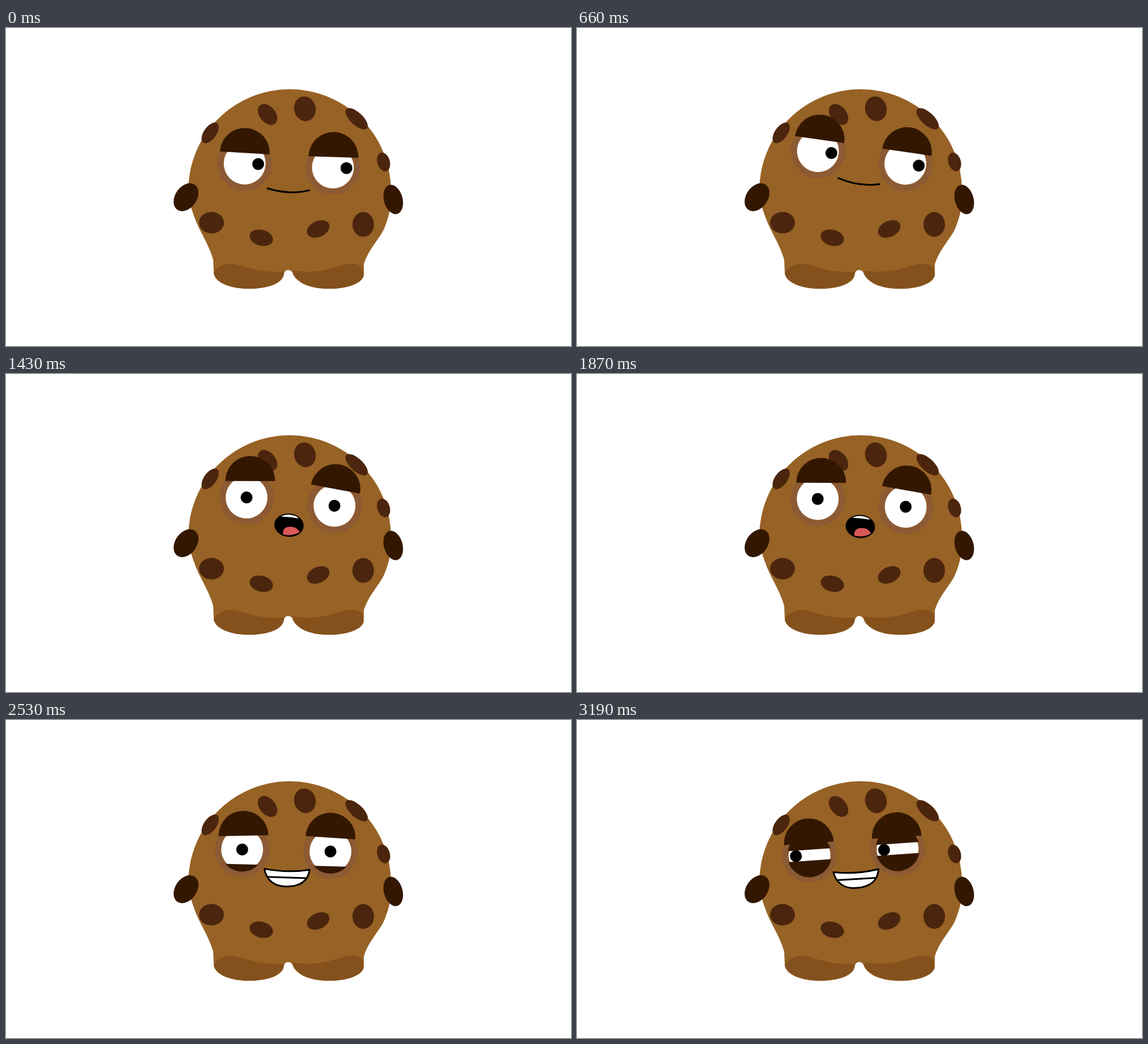
Animation of 998 by 561 pixels, one loop 3.36 s. Source, as an HTML page with a canvas:

```html
<!DOCTYPE html>
<html lang="en">
<head>
<meta charset="utf-8">
<title>Cookie</title>
<style>
html, body { margin: 0; width: 100%; height: 100%; overflow: hidden; background: #fff; }
canvas { display: block; }
</style>
</head>
<body>
<canvas id="stage" width="998" height="561"></canvas>
<script>
const ctx = document.getElementById('stage').getContext('2d');
const STEP = 110, LOOP = 3360, LAST = 29;
const DARK = '#331700', CHIP = '#4b250d', BODY = '#976225', FOOT = '#84511c', RING = '#8c5a33';
const CX = 501, CY = 287;
const EYE_GAP = 78, EYE_R = 37, LID_R = 39, LOOK = 24;

// Head poses; the whole face hangs on these.
const poses = [
  { at: 0, x: 499.5, y: 242.5, tilt: 2.6, lift: 18.5 },
  { at: 6, x: 502.8, y: 228.3, tilt: 8.2, lift: 20.5 },
  { at: 10, x: 502.3, y: 223.5, tilt: 5.6, lift: 30 },
  { at: 21, x: 503.3, y: 229.5, tilt: 4.8, lift: 28.2 },
  { at: 25, x: 487, y: 231, tilt: -2.2, lift: 20.6 },
  { at: 29, x: 488.5, y: 233, tilt: -4, lift: 20.8 }
];

const body = new Path2D(`M322 287 A179 179 0 0 1 680 287 C682 310 677 333 667 356
  C660 371 640 391 632 417 L632 437 C628 452 600 460 570 460 C540 460 517 452 507 435
  C506 425 492 424 491 434 C489 451 462 460 430 460 C398 460 370 450 367 433
  L366 409 C358 380 340 356 333 334 C326 315 322 302 322 287 Z`);
const leftFoot = new Path2D(`M367 433 C371 422 386 416 397 416 C420 417 440 433 490 430
  C494 448 462 460 430 460 C398 460 370 450 367 433 Z`);
const rightFoot = new Path2D(`M508 428 C568 436 583 416 612 416 C623 416 629 420 631 428
  L631 437 C628 452 600 460 570 460 C535 460 505 445 508 428 Z`);
const smile = new Path2D('M-38 0 Q2 11 38 0');
const teeth = new Path2D('M-15 -14 C-8 -20 10 -20 16 -13.5 Q0 -15 -15 -14 Z');
const tongue = new Path2D('M-9 17 C-11 9 -7 3 3 2.5 C12 2 16 5 20 10.5 Q6 20 -9 17 Z');
const grin = new Path2D('M-40 -15 Q0 -8 40 -15 C37 9 18 15.5 -2 15.5 C-22 15.5 -36 5 -40 -15 Z');
const biteLine = new Path2D('M-34 -0.7 L34 0');

const rad = deg => deg * Math.PI / 180;
const mix = (a, b, k) => a + (b - a) * k;
const ramp = (n, from, to) => Math.min(1, Math.max(0, (n - from) / (to - from)));

function poseAt(n) {
  const i = Math.max(1, poses.findIndex(p => p.at >= n));
  const a = poses[i - 1], b = poses[i], k = ramp(n, a.at, b.at);
  const pose = {};
  for (const key in a) pose[key] = mix(a[key], b[key], k);
  return pose;
}

// Half height of the eye opening: a squint at 10, a full blink at 25.
function lidAt(n) {
  const squint = 9.5 + 12 * Math.abs(n - 10);
  const blink = n < 25 ? 13 * (25 - n) : 2.4 * (n - 25);
  return Math.min(squint, blink);
}

const gazeAt = n => LOOK * (1 - ramp(n, 10, 12) - ramp(n, 23, 26));

function place(x, y, tilt, draw) {
  ctx.save();
  ctx.translate(x, y);
  ctx.rotate(rad(tilt));
  draw();
  ctx.restore();
}

function oval(x, y, rx, ry, color, tilt = 0) {
  ctx.beginPath();
  ctx.ellipse(x, y, rx, ry, rad(tilt), 0, 7);
  ctx.fillStyle = color;
  ctx.fill();
}

function arc(r, from, to) {
  ctx.beginPath();
  ctx.arc(0, 0, r, from, to);
  ctx.fillStyle = DARK;
  ctx.fill();
}

function fill(path, color) {
  ctx.fillStyle = color;
  ctx.fill(path);
}

function drawChips() {
  for (const [angle, size] of [[-144, 21], [-47, 25], [-17, 17]]) {
    const x = CX + 173.5 * Math.cos(rad(angle)), y = CY + 173.5 * Math.sin(rad(angle));
    oval(x, y, size, 11, CHIP, angle + 90);
  }
  const slim = [[462, 152.5, 50], [451, 370, 15], [551.5, 354.5, -25]];
  const plump = [[528, 142.5, 75], [363, 343.5, 0], [631, 346.5, 90]];
  for (const [x, y, tilt] of slim) oval(x, y, 21, 14, CHIP, tilt);
  for (const [x, y, tilt] of plump) oval(x, y, 22, 19, CHIP, tilt);
}

function drawBody() {
  ctx.fillStyle = '#fff';
  ctx.fillRect(0, 0, 998, 561);
  fill(body, BODY);
  fill(leftFoot, FOOT);
  fill(rightFoot, FOOT);
  drawChips();
  oval(318, 298.5, 27, 19, DARK, -55);
  oval(684, 302.5, 26.5, 16.5, DARK, 75);
}

function drawEye(gaze, lid) {
  oval(0, 0, 48, 48, RING);
  oval(0, 0, EYE_R, EYE_R, '#fff');
  oval(gaze, 0, 10.5, 10.5, '#000');
  if (lid >= EYE_R) return;
  const a = Math.asin(lid / LID_R);
  arc(LID_R, a, Math.PI - a);
  arc(LID_R, Math.PI + a, -a);
  if (lid < 2) {
    ctx.beginPath();
    ctx.moveTo(-38, 0);
    ctx.lineTo(38, 0);
    ctx.stroke();
  }
}

function drawMouth(n) {
  if (n < 8) {
    ctx.stroke(smile);
  } else if (n < 23) {
    oval(0, 0, 26, 20.5, '#000');
    fill(teeth, '#fff');
    fill(tongue, '#d95858');
  } else {
    ctx.translate(0.7, 6.3);
    fill(grin, '#fff');
    ctx.stroke(grin);
    ctx.stroke(biteLine);
  }
}

function drawFace(n) {
  const { x, y, tilt, lift } = poseAt(n);
  const raise = lift - 20;
  ctx.strokeStyle = '#000';
  ctx.lineWidth = 3;
  ctx.lineJoin = 'round';
  place(x, y, tilt, () => {
    for (const side of [-1, 1]) {
      const ex = side * EYE_GAP;
      place(ex, 0, 0, () => drawEye(gazeAt(n), lidAt(n)));
      // Raised brows also spread apart in tilt.
      place(ex + raise * (0.15 - 0.25 * side), -lift, 0.55 * raise * side,
        () => arc(44, Math.PI, 0));
    }
    place(1.2, 41.7, 0, () => drawMouth(n));
  });
}

function tick() {
  const t = performance.now() % LOOP;
  const n = Math.min(LAST, Math.floor(t / STEP));
  drawBody();
  drawFace(n);
  requestAnimationFrame(tick);
}
tick();
</script>
</body>
</html>
```
